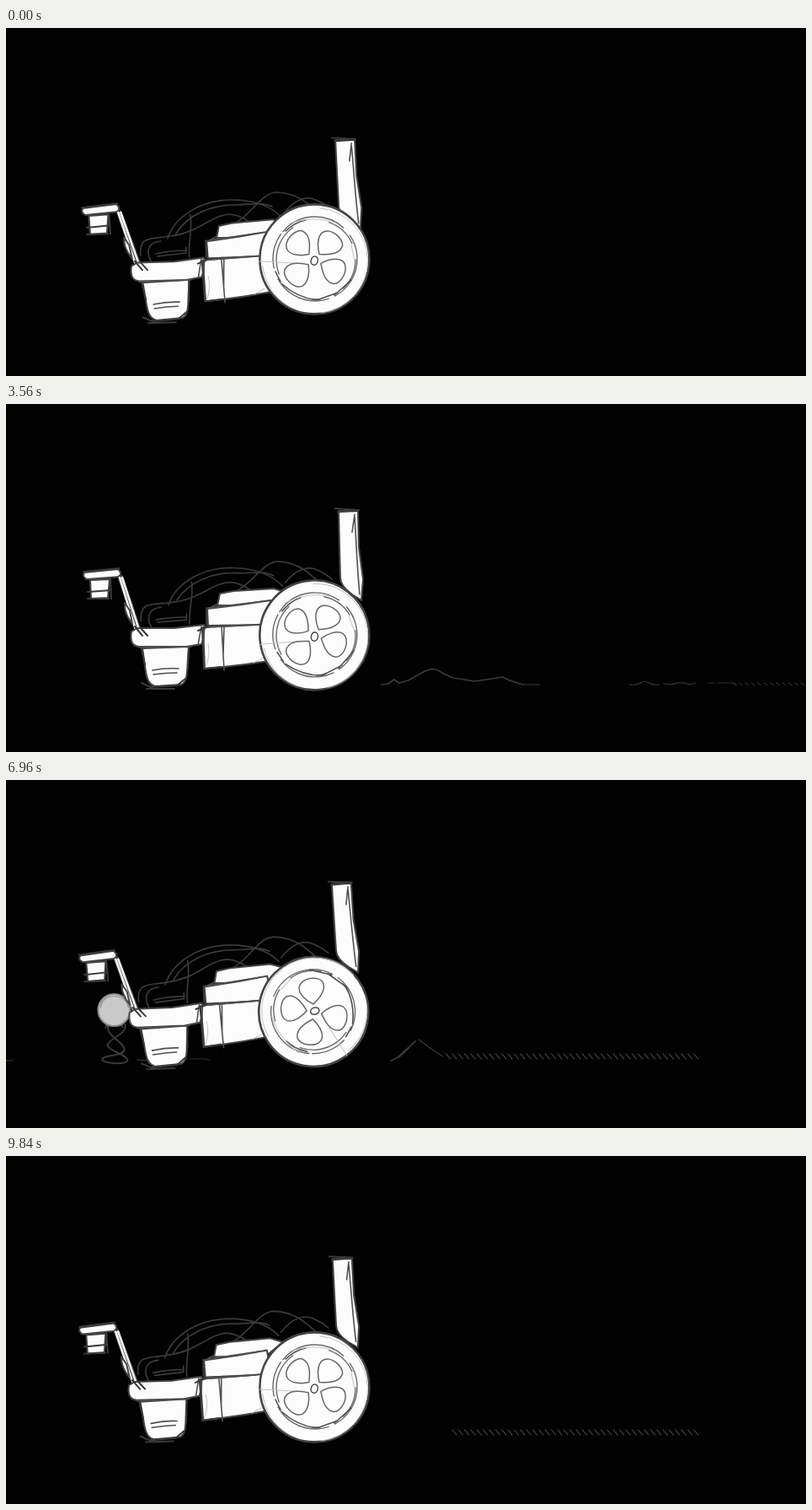
These frames come from a looping animation (950x413 px, 10 s). An HTML page:

```html
<!DOCTYPE html>
<html lang="en">
<head>
<meta charset="utf-8">
<title>Rolling machine</title>
<style>
  html, body { margin: 0; width: 100%; height: 100%; overflow: hidden; background: #020202; }
  svg { display: block; width: 950px; height: 413px; }
  path, circle, ellipse { fill: none; stroke: #3a3a3a; stroke-width: 2; stroke-linecap: round; stroke-linejoin: round; }
  .w { fill: #fcfcfc; stroke: #444; }
  .thin { stroke-width: 1.2; }
  .ink { stroke: #505050; stroke-width: 1.6; }
  .rim { stroke: #6a6a6a; stroke-width: 1.4; }
  .rod { stroke: #f6f6f6; stroke-width: 2.6; }
  .dim { stroke: #3a3a3a; stroke-width: 1.7; }
  .faint { stroke: #c4c4c4; stroke-width: 1; }
  .petal { stroke: #666; stroke-width: 1.5; }
  .ball { fill: #c9c9c9; stroke: #8a8a8a; }
</style>
</head>
<body>
<svg viewBox="0 0 950 413">
  <defs>
    <g id="jack">
      <path d="M84 290C76 302 104 311 102 321C98 329 80 325 76 331C74 337 104 338 106 333C106 326 84 322 82 315C84 306 106 302 103 290M80 294C82 287 98 288 100 293"/>
      <circle class="ball" cx="90" cy="273" r="19"/>
      <path class="thin" stroke-opacity=".4" d="M74 270C76 252 104 252 107 270"/>
    </g>
    <path id="petal" class="petal" d="M9 0C13 -7 22 -16 30 -15C42 -13 43 11 33 14C23 17 14 6 9 0Z"/>
  </defs>

  <g id="hill">
    <path class="dim" d="M718 333L726 332L733 327L739 331L750 328L768 318Q780 312 787 317L792 320L803 325L829 329L850 326L862 324L870 328L886 333"/>
    <path class="thin" d="M886 333H906"/>
  </g>
  <use href="#jack" id="jack1"/>
  <use href="#jack" id="jack2"/>
  <path id="curl" class="thin" d="M549 333Q557 334 562 331T572 331T584 333"/>
  <g id="flats">
    <path class="thin" d="M590 332Q598 334 605 331H615L620 333L628 331"/>
    <path class="thin" stroke-opacity=".8" d="M643 331H650M653 331H672L676 333"/>
  </g>
  <g id="mound">
    <path class="dim" d="M634 333L642 329L663 310M643 329L655 318"/>
    <path class="thin" d="M667 308L680 318L695 328"/>
  </g>
  <path id="trail" class="thin"/>

  <g id="body">
    <g transform="translate(0 -7) rotate(1.49 366 275)">
      <path class="dim" d="M192 250C200 225 230 204 268 204C295 204 315 212 327 224"/>
      <path class="dim" d="M202 244C216 221 245 210 270 210S305 206 316 212"/>
      <path class="dim" d="M270 233C292 222 303 195 322 195C345 196 358 206 380 228"/>
      <path class="dim" d="M330 220C343 203 357 199 368 204S380 210 386 215"/>
      <path class="dim" d="M160 270C158 246 172 251 195 247C230 243 243 222 266 221Q280 222 294 234"/>
      <path class="dim" d="M219 222C222 240 216 255 218 272M173 278C165 264 170 254 184 253M178 268Q195 264 214 264M180 271L214 267V260"/>
    </g>
    <path class="w" d="M395 127L418 127L419 170L424 208L422 233L411 226Q397 216 397 206L396 170Z"/>
    <path d="M391 124L419 126M394 128L418 127"/>
    <path class="ink thin" d="M414 131L411 152M414 134C416 165 417 195 420 226"/>

    <path class="w" d="M93 200L133 196Q138 200 135 205L96 208Q90 205 93 200Z"/>
    <path class="w" d="M100 209L123 208L121 230L101 231Z"/>
    <path d="M97 223L125 221M97 231L122 231M92 199L134 195M124 208L125 231"/>
    <path style="stroke-width:7" d="M136 206L158 270"/>
    <path class="rod" d="M135 206L154 268"/>
    <path class="rod" d="M138 206L158 268"/>
    <path class="w" d="M141 236Q140 248 150 261L147 245Z"/>

    <path class="w" d="M162 290L217 288L215 318Q214 331 208 333L177 335Q168 333 166 318Z"/>
    <path class="w" d="M149 270L156 266L200 266L235 262L238 270L232 285L214 288L158 288Q146 287 149 270Z"/>
    <path class="ink" d="M174 316Q190 313 205 314M175 321Q190 319 203 319"/>
    <path class="ink" d="M158 289L220 288M232 264L228 286"/>
    <path d="M161 331L172 336L203 334L213 326M167 338H200M161 291L165 310M217 290L216 314M153 264L162 275M160 266L168 275"/>

    <path class="w" d="M254 225L270 222L318 219L334 224L312 240L251 239Z"/>
    <path class="w" d="M239 243L280 238L314 233L318 262L240 263Z"/>
    <path class="w" d="M234 265L318 261L312 305Q275 311 236 314Z"/>
    <path class="ink" d="M256 264L259 316M259 264L258 296M236 265L300 262M240 242L306 234M250 238L240 243M236 264L234 288"/>
    <path d="M228 269L241 264M238 262V242M233 266L235 314L256 312"/>
    <path class="faint" d="M240 284Q243 300 237 312M294 307L306 301"/>
  </g>

  <g id="wheel">
    <circle class="w" r="65" cx=".4" cy="-.6" style="stroke-width:2.6"/>
    <circle r="62.5" cx="1" cy="1" class="faint" stroke-dasharray="90 40 60 110"/>
    <circle class="rim" r="50" cx="1" cy="-1" stroke-dasharray="54 8 70 14 42 4 80 12"/>
    <circle class="rim thin" r="47" cx="2" cy="0" stroke-dasharray="38 30 12 50 62 45"/>
    <path class="ink" d="M-38 29Q-20 45 3 48L28 39M-46 14L-40 26M24 42L44 24M-34 -34Q-22 -45 -10 -47"/>
    <path class="faint" d="M-65 2L-24 4M-30 -43Q0 -53 25 -44M44 -18L48 2"/>
    <use href="#petal" transform="rotate(-134)"/>
    <use href="#petal" transform="rotate(-47)"/>
    <use href="#petal" transform="rotate(29)"/>
    <use href="#petal" transform="rotate(140)"/>
    <ellipse class="ink" rx="4" ry="5.2" cx=".6" cy="1" transform="rotate(18)"/>
  </g>
</svg>
<script>
const LOOP = 10000, TICK = 40, LAST = 245;
const SPEED = 7.36;            // ground px per tick
const TURN = 360 / 9.8;        // wheel degrees per tick
const HUB = [366, 275];
const $ = id => document.getElementById(id);

// tick, pitch (mrad), dx, dy of the body
const POSES = [
  [0, -26, 0, 7], [51, 4, 1, 2], [88, 0, 0, 0], [99, -4, 0, 0],
  [107, -37, -1, 2], [114, -35, -1, 1.5], [149, -44, -2, -2],
  [199, -35, -2.5, -3], [235, -28, -3, -4], [245, -28, -3, -4]
];

function pose(n) {
  let i = 1;
  while (i < POSES.length - 1 && POSES[i][0] < n) i++;
  const a = POSES[i - 1], b = POSES[i], k = (n - a[0]) / (b[0] - a[0]);
  return a.map((v, j) => v + (b[j] - v) * k);
}

const place = (id, x) => $(id).setAttribute('transform', `translate(${x} 0)`);
const show = (id, on) => $(id).style.display = on ? '' : 'none';

// marks left behind at each tick
function marks(from, to, y, w, h) {
  let d = '';
  for (let x = to; x >= from; x -= SPEED) d += `M${x - w} ${y}l${w} ${h}`;
  return d;
}

function trail(n) {
  const back = (x, ref) => x + SPEED * (ref - n);
  if (n >= 131) return marks(n < 183 ? back(697, 149) : 534, 822, 325, 5, 6);
  if (n >= 77 && n < 105) return marks(back(675, 114), 948, 331, 4, 2.5);
  if (n < 53) return marks(back(890, 51), 950, 333, 4, 0);
  return '';
}

function draw(t) {
  const n = Math.min(LAST, Math.max(0, Math.floor(t / TICK) - 1));
  const shift = ref => SPEED * (ref - n);

  place('hill', shift(51));
  place('jack1', shift(51));
  place('jack2', 215 + shift(149));
  place('curl', shift(114));
  place('flats', shift(114));
  place('mound', shift(149));
  show('jack1', n >= 17);
  show('jack2', n >= 146);
  show('curl', n < 146);
  $('trail').setAttribute('d', trail(n));
  $('trail').style.stroke = n < 131 ? '#2a2a2a' : '#3a3a3a';

  const [, pitch, dx, dy] = pose(n);
  $('body').setAttribute('transform',
    `translate(${dx} ${dy}) rotate(${pitch * .0573} ${HUB[0]} ${HUB[1]})`);
  $('wheel').setAttribute('transform', `translate(${HUB[0]} ${HUB[1]}) rotate(${n * TURN})`);
}

const start = performance.now();
function loop() {
  draw((performance.now() - start) % LOOP);
  requestAnimationFrame(loop);
}
draw(0);
requestAnimationFrame(loop);
</script>
</body>
</html>
```
